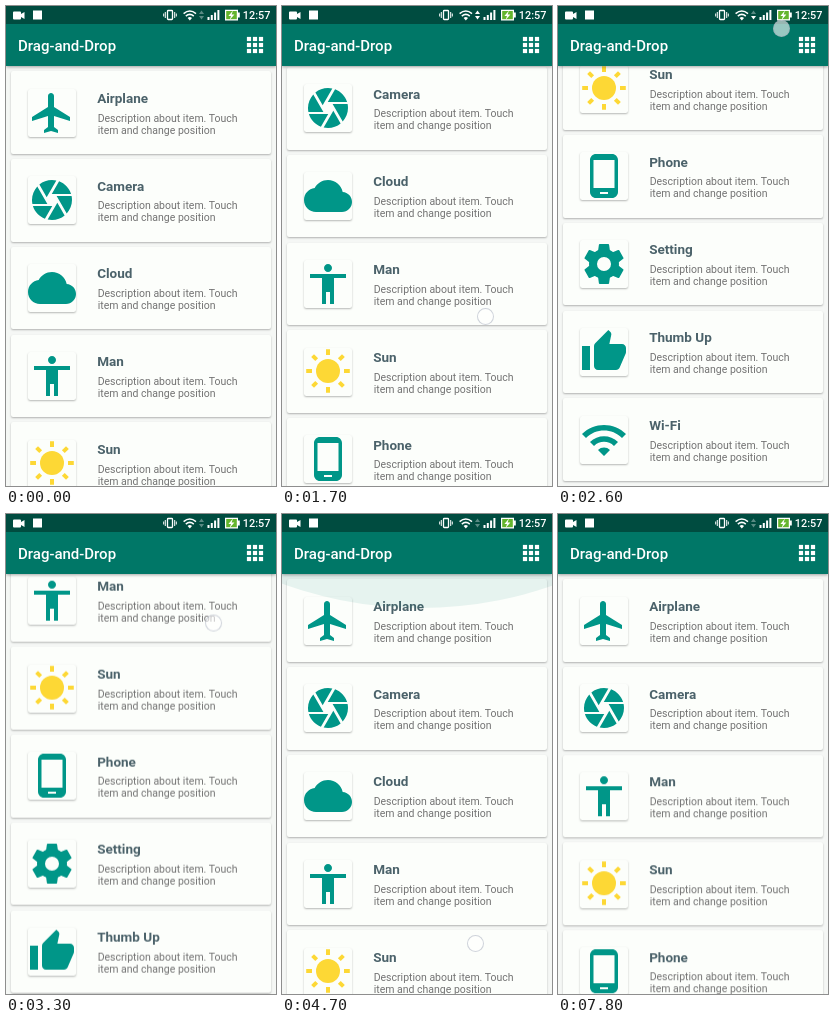
Animation of 270 by 480 pixels, one loop 8000 ms. Source, as an HTML page:

```html
<!DOCTYPE html>
<html lang="en">
<head>
<meta charset="utf-8">
<title>Drag-and-Drop list</title>
<style>
html, body { margin: 0; width: 100%; height: 100%; overflow: hidden; background: #f5f7f5; }
#stage { position: relative; width: 270px; height: 480px; overflow: hidden; font-family: Roboto, sans-serif; }
#stage * { box-sizing: border-box; }
.anim, .card { animation: 8s -40ms infinite; }

#status { position: absolute; z-index: 4; left: 0; top: 0; }
#bar { position: absolute; z-index: 3; inset: 0 0 auto; height: 60px; background: #007767; box-shadow: 0 1px 3px rgba(0,0,0,.35); }
#bar b { position: absolute; left: 12px; top: 30.8px; font: 500 15px/18px Roboto, sans-serif; color: #fff; }

#list { position: absolute; inset: 0; animation-name: scroll; }
.card { position: absolute; left: 5.25px; width: 259.5px; height: 82.5px; border-radius: 2px; background: #fcfefb; box-shadow: 0 1px 2px rgba(0,0,0,.28); white-space: nowrap; }
.card svg { position: absolute; left: 16.9px; top: 17.25px; width: 48px; height: 48px; border-radius: 2.5px; background: #fcfefb; box-shadow: 0 1px 2px rgba(0,0,0,.28); fill: #009688; }
.card h2 { position: absolute; left: 85.9px; top: 18.6px; margin: 0; font: 700 13.5px/16px Roboto, sans-serif; color: #4b626a; }
.card p { position: absolute; left: 86.4px; top: 41.4px; margin: 0; font: 400 10.5px/12px Roboto, sans-serif; color: #737373; }
.swiped { animation-name: swipe; }
.below { animation-name: close-gap; }

#glow { position: absolute; z-index: 2; left: -267px; top: -716px; width: 810px; height: 810px; border-radius: 50%; background: rgba(0,130,112,.085); animation-name: glow; }
.touch { position: absolute; z-index: 5; left: -8.5px; top: -8.5px; width: 17px; height: 17px; border-radius: 50%; border: 1px solid rgba(160,168,184,.5); background: rgba(255,255,255,.6); }
#drag { animation-name: drag; }
#fling { animation-name: fling; }
#up { animation-name: up; }
#down { animation-name: down; }

@keyframes scroll {
  0%, 13.75% { transform: translateY(0); animation-timing-function: steps(2); }
  16.25% { transform: translateY(-14px); animation-timing-function: steps(4); }
  21.25% { transform: translateY(-92px); animation-timing-function: steps(8); }
  31.25% { transform: translateY(-362px); animation-timing-function: steps(1); }
  32.5%, 36.25% { transform: translateY(-375px); animation-timing-function: steps(1); }
  37.5% { transform: translateY(-356px); animation-timing-function: steps(8); }
  47.5% { transform: translateY(-162.2px); animation-timing-function: steps(7); }
  56.25%, 100% { transform: translateY(0); }
}
@keyframes drag {
  0% { opacity: 0; transform: translate(198px, 404px); animation-timing-function: steps(1); }
  13.75% { opacity: 1; transform: translate(198px, 404px); animation-timing-function: steps(2); }
  16.25% { opacity: 1; transform: translate(199px, 388px); animation-timing-function: steps(4); }
  21.25% { opacity: 1; transform: translate(203px, 310px); animation-timing-function: steps(8); }
  31.25% { opacity: 1; transform: translate(221px, 40px); animation-timing-function: steps(1); }
  32.5% { opacity: 1; transform: translate(223px, 22px); animation-timing-function: steps(2); }
  35% { opacity: 1; transform: translate(222px, 12px); animation-timing-function: steps(1); }
  36.25% { opacity: 1; transform: translate(220px, 17px); animation-timing-function: steps(1); }
  37.5% { opacity: 1; transform: translate(217px, 36px); animation-timing-function: steps(8); }
  47.5% { opacity: 1; transform: translate(190.5px, 229.5px); animation-timing-function: steps(7); }
  56.25% { opacity: 1; transform: translate(191px, 392px); animation-timing-function: steps(2); }
  58.75% { opacity: 1; transform: translate(193px, 429px); animation-timing-function: steps(1); }
  60%, 100% { opacity: 0; transform: translate(193px, 429px); }
}
@keyframes glow {
  0%, 56.25% { opacity: 1; transform: translateY(-34px); animation-timing-function: steps(2); }
  58.75% { opacity: 1; transform: none; animation-timing-function: steps(1); }
  60% { opacity: .6; transform: translateY(-14px); animation-timing-function: steps(1); }
  61.25%, 100% { opacity: 0; transform: translateY(-34px); }
}
@keyframes swipe {
  0%, 71.25% { transform: none; opacity: 1; background: #fcfefb; animation-timing-function: steps(3); }
  75% { transform: translateX(20px); opacity: .926; background: #f0f2f0; animation-timing-function: steps(2); }
  77.5% { transform: translateX(52px); opacity: .807; background: #eef0ee; animation-timing-function: steps(2); }
  80% { transform: translateX(118px); opacity: .563; background: #eef0ee; animation-timing-function: steps(3); }
  83.75%, 100% { transform: translateX(270px); opacity: 0; background: #eef0ee; }
}
@keyframes fling {
  0% { opacity: 0; transform: translate(57px, 289px); animation-timing-function: steps(1); }
  72.5% { opacity: 1; transform: translate(63px, 289px); animation-timing-function: steps(2); }
  75% { opacity: 1; transform: translate(77px, 289px); animation-timing-function: steps(2); }
  77.5% { opacity: 1; transform: translate(109.5px, 289px); animation-timing-function: steps(1); }
  78.75% { opacity: 1; transform: translate(142px, 289px); animation-timing-function: steps(1); }
  80%, 100% { opacity: 0; transform: translate(175px, 289px); }
}
@keyframes close-gap {
  0%, 85% { transform: none; animation-timing-function: steps(1); }
  86.25% { transform: translateY(-12px); animation-timing-function: steps(1); }
  87.5% { transform: translateY(-45px); animation-timing-function: steps(1); }
  88.75% { transform: translateY(-78px); animation-timing-function: steps(1); }
  90%, 100% { transform: translateY(-87.75px); }
}
@keyframes up {
  0%, 25%, 100% { opacity: .35; animation-timing-function: steps(1); }
  13.75% { opacity: 1; animation-timing-function: steps(1); }
}
@keyframes down {
  0%, 36.25%, 100% { opacity: .35; animation-timing-function: steps(1); }
  13.75% { opacity: 1; animation-timing-function: steps(1); }
}
</style>
</head>
<body>
<div id="stage">
  <div id="list" class="anim"></div>
  <div id="glow" class="anim"></div>
  <div id="bar"><b>Drag-and-Drop</b></div>
  <svg id="status" width="270" height="60" fill="#fff">
    <rect width="270" height="18" fill="#004c40"/>
    <path d="M8 5.5h6q1 0 1 1v1.4l3.5-2v7l-3.5-2v1.6q0 1-1 1H8q-1 0-1-1v-6q0-1 1-1z"/>
    <rect x="27" y="4.5" width="9" height="9"/>
    <g fill="none" stroke="#fff">
      <rect x="161.5" y="4.5" width="5" height="9" rx=".8" stroke-width="1.3"/>
      <path d="M159.3 6v6M157.7 7.5v3M168.7 6v6M170.3 7.5v3"/>
      <path d="M177.6 7.6q6.2-5.2 12.4 0M179.8 10.1q4-3.4 8 0" stroke-width="1.5"/>
    </g>
    <path d="M181.6 12q2.2-1.8 4.4 0l-2.2 2.5z"/>
    <path id="up" class="anim" d="M193 8l2.5-3.6L198 8z"/>
    <path id="down" class="anim" d="M193 10l2.5 3.6L198 10z"/>
    <path d="M201.5 11h2v3h-2zM204.8 9h2v5h-2zM208.1 6.5h2v7.5h-2zM211.4 4h2v10h-2z"/>
    <path d="M219 3.8h13v2.8h1.8v5H232v2.8h-13z"/>
    <path d="M220.2 5h10.6v8.2h-10.6z" fill="#64b52d"/>
    <path d="M227 4.6l-4.6 5.4h2.6l-1.4 4 4.8-5.6h-2.8z"/>
    <text x="236.8" y="13.2" font-family="Roboto, sans-serif" font-size="10.9" font-weight="500">12:57</text>
    <g id="grid"></g>
  </svg>
  <div id="drag" class="touch anim"></div>
  <div id="fling" class="touch anim"></div>
</div>
<script>
const PITCH = 87.75, TOP = 65.25;
const path = d => `<path d="${d}"/>`;
const spokes = (n, cy, d) => Array.from({ length: n }, (_, i) =>
  `<path d="${d}" transform="rotate(${i * 360 / n} 12 ${cy})"/>`).join('');

const items = [
  ['Airplane', path('M21 16v-2l-8-5V3.5c0-.83-.67-1.5-1.5-1.5S10 2.67 10 3.5V9l-8 5v2l8-2.5V19l-2 1.5V22l3.5-1 3.5 1v-1.5L13 19v-5.5l8 2.5z')],
  ['Camera', path('M9.4 10.5l4.77-8.26C13.47 2.09 12.75 2 12 2c-2.4 0-4.6.85-6.32 2.25l3.66 6.35.06-.1zM21.54 9c-.92-2.92-3.15-5.26-6-6.34L11.88 9h9.66zm.26 1h-7.49l.29.5 4.76 8.25C21 16.97 22 14.61 22 12c0-.69-.07-1.35-.2-2zM8.54 12l-3.9-6.75C3.01 7.03 2 9.39 2 12c0 .69.07 1.35.2 2h7.49l-1.15-2zm-6.08 3c.92 2.92 3.15 5.26 6 6.34L12.12 15H2.46zm11.27 0l-3.9 6.76c.7.15 1.42.24 2.17.24 2.4 0 4.6-.85 6.32-2.25l-3.66-6.35-.93 1.6z')],
  ['Cloud', path('M19.35 10.04C18.67 6.59 15.64 4 12 4 9.11 4 6.6 5.64 5.35 8.04 2.34 8.36 0 10.91 0 14c0 3.31 2.69 6 6 6h13c2.76 0 5-2.24 5-5 0-2.64-2.05-4.78-4.65-4.96z')],
  ['Man', path('M12 2c1.1 0 2 .9 2 2s-.9 2-2 2-2-.9-2-2 .9-2 2-2zm9 7h-6v13h-2v-6h-2v6H9V9H3V7h18v2z')],
  ['Sun', `<g fill="#fdd835"><circle cx="12" cy="11.5" r="6"/>${spokes(8, 11.5, 'M11 .6h2v2.9h-2z')}</g>`],
  ['Phone', path('M16 1H8C6.34 1 5 2.34 5 4v16c0 1.66 1.34 3 3 3h8c1.66 0 3-1.34 3-3V4c0-1.66-1.34-3-3-3zm-2 20h-4v-1h4v1zm3.25-3H6.75V4h10.5v14z')],
  ['Setting', `<circle cx="12" cy="12" r="5.5" fill="none" stroke="#009688" stroke-width="4"/>${spokes(6, 12, 'M9.9 2q-.4 0-.45.4L9 5.6 8.4 7h7.2L15 5.6l-.45-3.2q-.05-.4-.45-.4z')}`],
  ['Thumb Up', path('M1 21h4V9H1v12zm22-11c0-1.1-.9-2-2-2h-6.31l.95-4.57.03-.32c0-.41-.17-.79-.44-1.06L14.17 1 7.59 7.59C7.22 7.95 7 8.45 7 9v10c0 1.1.9 2 2 2h9c.83 0 1.54-.5 1.84-1.22l3.02-7.05c.09-.23.14-.47.14-.73v-2z')],
  ['Wi-Fi', path('M1 9l2 2c4.97-4.97 13.03-4.97 18 0l2-2C16.93 2.93 7.08 2.93 1 9zm8 8l3 3 3-3c-1.65-1.66-4.34-1.66-6 0zm-4-4l2 2c2.76-2.76 7.24-2.76 10 0l2-2C15.14 9.14 8.87 9.14 5 13z')]
];

document.getElementById('list').innerHTML = items.map(([name, icon], i) => {
  const role = i === 2 ? 'swiped' : i > 2 ? 'below' : '';
  return `<div class="card ${role}" style="top:${TOP + i * PITCH}px">
    <svg viewBox="0 0 24 24">${icon}</svg><h2>${name}</h2>
    <p>Description about item. Touch<br>item and change position</p></div>`;
}).join('');

document.getElementById('grid').innerHTML = Array.from({ length: 9 }, (_, i) =>
  `<rect x="${240.9 + i % 3 * 6}" y="${30.9 + Math.floor(i / 3) * 6}" width="4.2" height="4.2"/>`).join('');
</script>
</body>
</html>
```
